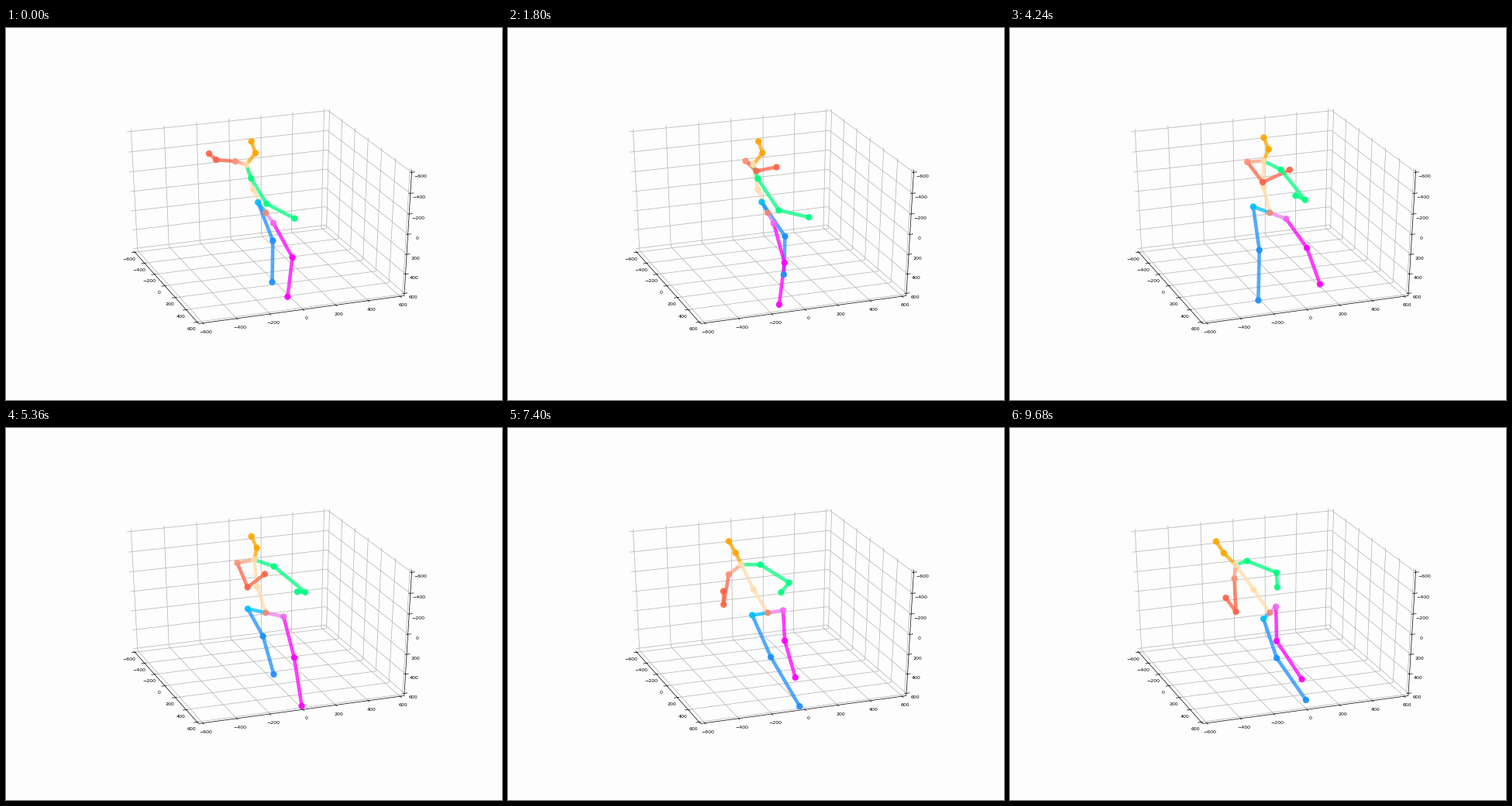
Animation of 640x480 px, one loop 9.72 s. Source, as a matplotlib script:

```python
import numpy as np
import matplotlib.pyplot as plt
from matplotlib.animation import FuncAnimation
from matplotlib.collections import LineCollection

W, H, DPI = 640, 480, 100
FRAMES, STEP = 243, 40

# Camera: a unit cube seen from 30 degrees above, turned by 20 degrees
ELEV, TURN, DIST = np.radians(30), np.radians(20), 10
CENTER = np.array([334.7, 238.0])
SCALE = np.array([2681, -1770])
EDGE = 0.5 + 1 / 48
TICKS = range(-600, 601, 200)


def project(x, y, z):
    """Cube coordinates (x right, y towards the viewer, z up) to pixels."""
    right = x * np.cos(TURN) + y * np.sin(TURN)
    near = y * np.cos(TURN) - x * np.sin(TURN)
    up = z * np.cos(ELEV) - near * np.sin(ELEV)
    depth = DIST - near * np.cos(ELEV) - z * np.sin(ELEV)
    return CENTER + SCALE * np.array([right, up]) / depth


def path(*points):
    return [project(*p) for p in points]


def draw_box(ax):
    e, out, inn = EDGE, EDGE + 0.0167, EDGE - 0.0083
    grid, marks = [], []

    def label(pos, dx, dy, value):
        ax.text(pos[0] + dx, pos[1] + dy, str(value).replace("-", "\u2212"),
                fontsize=4.5, ha="center", va="center", color="black")

    for value in TICKS:
        u = value / 1200
        grid.append(path((u, -e, e), (u, -e, -e), (u, e, -e)))
        grid.append(path((e, u, e), (e, u, -e), (-e, u, -e)))
        grid.append(path((e, e, -u), (e, -e, -u), (-e, -e, -u)))
        marks.append(path((u, inn, -e), (u, out, -e)))
        marks.append(path((-inn, u, -e), (-out, u, -e)))
        marks.append(path((inn, e, -u), (out, e, -u)))
        label(project(u, e, -e), 4, 11.6, value)
        label(project(-e, u, -e), -7.2, 9, value)
        label(project(e, e, -u), 11.5, 5, value)

    axes = [path((-e, e, -e), (e, e, -e)),
            path((-e, -e, -e), (-e, e, -e)),
            path((e, e, -e), (e, e, e))]
    ax.add_collection(LineCollection(grid, colors="#b0b0b0", linewidths=0.5, zorder=1))
    ax.add_collection(LineCollection(axes + marks, colors="black", linewidths=0.5, zorder=2))


def curve(t, *keys):
    """Smooth path through keys of a time and one or more values."""
    keys = np.array(keys, float)
    k, p = keys[:, 0], keys[:, 1:]
    slope = np.gradient(p, k, axis=0)
    i = np.clip(np.searchsorted(k, t, side="right") - 1, 0, len(k) - 2)
    span = (k[i + 1] - k[i])[:, None]
    s = (t - k[i])[:, None] / span
    return (p[i] * (1 + 2 * s) * (1 - s) ** 2 + slope[i] * span * s * (1 - s) ** 2
            + p[i + 1] * s ** 2 * (3 - 2 * s) - slope[i + 1] * span * s ** 2 * (1 - s))


def xy(x, y):
    return np.stack(np.broadcast_arrays(x, y), axis=1)


def walk(t):
    """Screen positions of every joint at the times t."""
    # The walker turns from facing right, past facing away, to facing left
    yaw = np.radians(curve(t, (0, 25), (2.6, 25), (4.24, 65), (6.48, 95),
                           (8.32, 147), (9.68, 160))[:, 0])
    gait = np.radians(np.interp(t, [0, 1.8, 2.8, 4.24, 9.68], [180, 375, 455, 625, 1275]))
    sin, cos = np.sin(yaw), np.cos(yaw)
    ahead = xy(cos, -0.45 * sin)

    root = np.full((len(t), 2), [335.1, 238.4])
    j = {"root": root}

    half_hips = xy(23.5 * sin, 3 + 11.5 * cos)
    for side, sign in (("l", -1), ("r", 1)):
        hip = root - sign * half_hips
        swing = np.maximum(0, sign * np.cos(gait))
        stride = sign * 44 * np.sin(gait)
        leg = xy(31 - 14 * cos, 103 - 8 * swing) + stride[:, None] * ahead
        bend = (11 + 6 * swing)[:, None] * ahead
        j[side + "_hip"] = hip
        j[side + "_knee"] = hip + leg / 2 + bend
        j[side + "_ankle"] = hip + leg

    lean = curve(t, (0, -25), (2.8, -15), (4.5, -8), (6.5, -28), (9.68, -44))[:, 0]
    spine = xy(lean, -62 - 7 * np.exp(-((t - 5) / 1.3) ** 2))
    j["spine"] = root + spine / 2 + xy(-4 * np.cos(yaw - 0.9), 1)
    j["neck"] = neck = root + spine
    j["nose"] = neck + xy(15 * np.cos(yaw - 0.26) - 3, -15)
    j["head"] = j["nose"] + xy(2.5 * cos - 7.5, -15)

    chest = neck + xy(1.1 * t - 4, 6.5)
    half_chest = xy(24 * sin, 12 * cos)
    j["l_shoulder"] = chest + half_chest
    j["r_shoulder"] = chest - half_chest

    # Arms: each joint relative to the one before it
    j["l_elbow"] = j["l_shoulder"] + curve(
        t, (0, 20, 33), (1.8, 27, 41), (4.2, 31, 39), (6.5, 46, 27), (8.3, 29, 20), (9.68, 38, 15))
    j["l_wrist"] = j["l_elbow"] + curve(
        t, (0, 36, 19), (1.8, 39, 9), (2.8, 6, -2), (6.5, -8, 6), (8.3, -10, 18), (9.68, 1, 19))
    j["r_elbow"] = j["r_shoulder"] + curve(
        t, (0, -25, -2), (0.5, -32, 2), (1.8, 14, 13), (4.2, 20, 26), (8.3, -8, 41), (9.68, 2, 43))
    j["r_wrist"] = j["r_elbow"] + curve(
        t, (0, -9, -8), (0.5, -12, -9), (1.8, 26, -5), (4.2, 35, -16), (6.5, 7, -17), (9.68, -13, -18))
    return j


BLUE, PINK, GREEN, RED = "dodgerblue", "magenta", "springgreen", "tomato"
SAND, GOLD = "navajowhite", "orange"

# (from, to, line colour, colour of the far joint)
BONES = [
    ("root", "spine", SAND, SAND),
    ("spine", "neck", SAND, SAND),
    ("neck", "nose", GOLD, GOLD),
    ("nose", "head", GOLD, GOLD),
    ("neck", "r_shoulder", "#ff9f80", "#fb9378"),
    ("r_shoulder", "r_elbow", RED, RED),
    ("r_elbow", "r_wrist", RED, RED),
    ("neck", "l_shoulder", GREEN, GREEN),
    ("l_shoulder", "l_elbow", GREEN, GREEN),
    ("l_elbow", "l_wrist", GREEN, GREEN),
    ("root", "r_hip", "deepskyblue", "deepskyblue"),
    ("r_hip", "r_knee", BLUE, BLUE),
    ("r_knee", "r_ankle", BLUE, BLUE),
    ("root", "l_hip", "violet", "#f268f2"),
    ("l_hip", "l_knee", PINK, PINK),
    ("l_knee", "l_ankle", PINK, PINK),
]

fig = plt.figure(figsize=(W / DPI, H / DPI), dpi=DPI, facecolor="#fdfdfd")
ax = fig.add_axes([0, 0, 1, 1])
ax.set_xlim(0, W)
ax.set_ylim(H, 0)
ax.axis("off")
draw_box(ax)

joints = walk(np.arange(FRAMES) * STEP / 1000)
lines = [ax.plot([], [], color=bone[2], lw=3.3, alpha=0.76, zorder=3,
                 solid_capstyle="butt")[0] for bone in BONES]
dot_names = ["root"] + [bone[1] for bone in BONES]
dot_colors = ["#f08a72"] + [bone[3] for bone in BONES]
dots = ax.scatter(*np.zeros((2, len(dot_names))), s=36, c=dot_colors,
                  linewidths=0, alpha=0.93, zorder=4)


def update(n):
    for line, (a, b, *_) in zip(lines, BONES):
        line.set_data(*np.array([joints[a][n], joints[b][n]]).T)
    dots.set_offsets([joints[name][n] for name in dot_names])
    return [*lines, dots]


anim = FuncAnimation(fig, update, frames=FRAMES, interval=STEP, repeat=True,
                     repeat_delay=0, blit=False)
plt.show()
```
